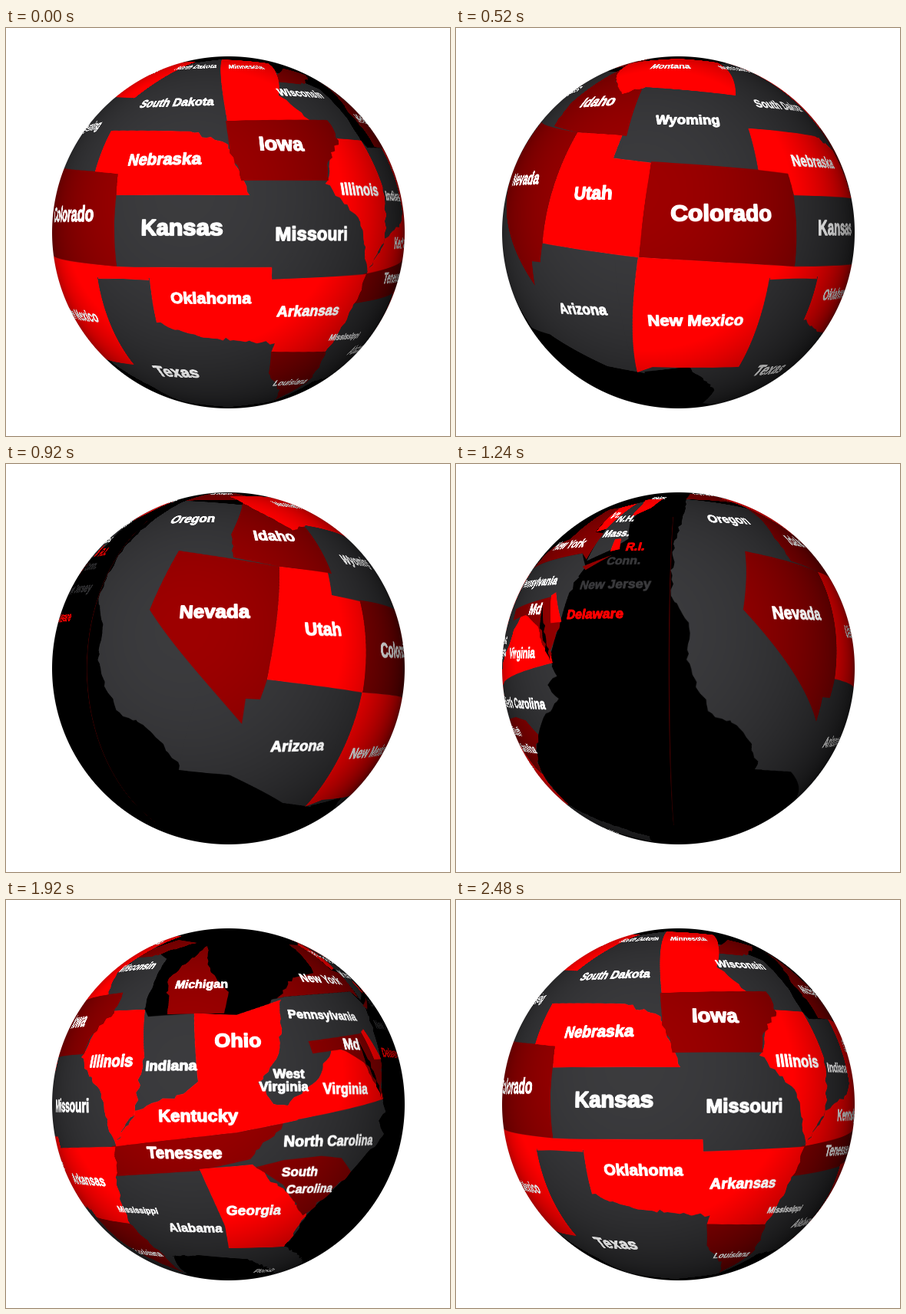
Recreate the animation shown at these times as an HTML page with a canvas. Size 578 by 532 pixels, loop 2520 ms.

```html
<!DOCTYPE html>
<html lang="en">
<head>
<meta charset="utf-8">
<title>Turning globe</title>
<style>
  html, body { margin: 0; height: 100%; overflow: hidden; background: #fff; }
  canvas { display: block; }
</style>
</head>
<body>
<canvas id="stage" width="578" height="532"></canvas>
<script>
const STEPS = 63, STEP_MS = 40;
const CX = 289.5, CY = 266.5, R = 229.5;            // globe on the stage
const EYE = 9, K = Math.sqrt(EYE * EYE - 1);        // camera distance in radii
const W = 1890, H = 945, DEG = W / 360;             // flat map
const GRAY = '#2d2d2f', RED = '#ff0000', DARK = '#780000', WHITE = '#ffffff';

let seed = 7;
const noise = () => (seed = seed * 16807 % 2147483647) / 2147483647 - 0.5;

// Stage point -> point on the unit sphere
function unproject(x, y) {
  const px = (x - CX) / R, py = (CY - y) / R, rr = px * px + py * py, a = rr / (K * K);
  const z = (a * EYE + Math.sqrt(Math.max(0, 1 - rr))) / (1 + a), s = (EYE - z) / K;
  return { x: px * s, y: py * s, z };
}

// Sphere point -> flat map, with the globe turned by a number of steps
function toMap(p, turn) {
  const u = Math.atan2(p.x, p.z) / (2 * Math.PI) + 2.5 - turn / STEPS;
  return [u % 1 * W, (0.5 - Math.atan2(p.y, Math.hypot(p.x, p.z)) / Math.PI) * H];
}

const sheet = document.createElement('canvas');
sheet.width = W;
sheet.height = H;
const map = sheet.getContext('2d', { willReadFrequently: true });
map.fillRect(0, 0, W, H);
map.textAlign = 'center';
map.textBaseline = 'middle';
map.lineJoin = 'round';

// Corners are given as seen on the globe at the current turn;
// "~" makes the edge that leads to a corner ragged, like a river or a coast
let turn = 0;
function land(color, corners) {
  map.fillStyle = color;
  map.beginPath();
  let from;
  for (const corner of corners.split(' ')) {
    const to = toMap(unproject(...corner.replace('~', '').split(',').map(Number)), turn);
    if (corner[0] === '~') {
      const [dx, dy] = [to[0] - from[0], to[1] - from[1]];
      const parts = Math.ceil(Math.hypot(dx, dy) / 9);
      for (let i = 1; i < parts; i++) {
        map.lineTo(from[0] + dx * i / parts + noise() * 7, from[1] + dy * i / parts + noise() * 7);
      }
    }
    map.lineTo(...to);
    from = to;
  }
  map.fill();
}

// Size is the em width in degrees of longitude
function label(text, x, y, size = 5.3, color = WHITE) {
  const em = size * DEG;
  map.save();
  map.translate(...toMap(unproject(x, y), turn));
  map.scale(1, 0.92);
  map.font = `bold ${em}px Arial, "Liberation Sans", sans-serif`;
  map.fillStyle = map.strokeStyle = color;
  map.lineWidth = em * 0.05;
  map.strokeText(text, 0, 0);
  map.fillText(text, 0, 0);
  map.restore();
}

// Map edge
map.fillStyle = '#380000';
map.fillRect(0, H * 0.2, 1.5, H * 0.62);

// The whole country in gray, seen from five sides
turn = 31;
land(GRAY, '300,46 ~284,100 ~280,172 ~303,207 ~300,255 ~328,322 ~366,341 ~399,399 450,402 480,190 405,60');
turn = 23;
land(GRAY, '225,399 290,405 360,442 396,447 464,298 480,200 400,70 330,60 250,300');
turn = 13;
land(GRAY, '240,75 350,60 450,110 490,200 490,320 440,430 400,478 340,486 ~300,442 236,449');
turn = 0;
land(GRAY, '243,46 281,41 358,60 408,80 ~460,143 480,300 416,422 398,462 345,487 290,494 230,487 157,440 110,300 110,140 165,92');
turn = 48;
land(GRAY, '105,180 130,143 181,143 185,152 245,148 300,150 358,130 450,130 462,200 450,340 391,411 ~362,452 ~375,480 340,492 ~310,468 250,463 ~190,465 110,420');
turn = 39;
land(GRAY, '168,132 186,127 308,113 327,131 ~318,165 316,206 303,257 ~318,277 ~299,289 ~318,307 ~281,333 258,357 212,412 100,400 90,300');
land(GRAY, '314,50 325,46 345,76 364,98 350,112 324,124 318,84');

// West
turn = 31;
land(DARK, '299,46 380,48 330,39 304,39');
turn = 23;
land(DARK, '308,50 ~350,73 ~390,83 424,143 356,134 296,122 ~293,92');
land(DARK, '225,113 356,134 340,281 331,307 312,306 307,339 187,190');
land(RED, '356,134 419,142 424,171 468,181 464,298 340,281');
turn = 13;
land(RED, '228,46 ~216,86 ~247,77 364,88 340,45 290,40');
land(DARK, '254,174 434,189 441,311 238,299');
land(RED, '237,299 441,311 470,311 470,327 408,326 368,442 256,442 236,449');

// East
turn = 48;
land(DARK, '165,76 225,52 250,56 ~190,74');
land(DARK, '210,149 ~212,102 ~262,60 ~266,92 ~290,120 284,148');
land(DARK, '138,321 300,303 361,291 ~318,338 252,353 130,361');
land(RED, '131,145 181,143 180,205 ~168,275 ~142,319 ~124,253 ~98,205 ~118,170');
land(RED, '245,148 300,150 358,130 ~355,200 ~328,238 ~350,270 380,287 300,303 143,321 ~168,275 ~231,253 250,237');
land(RED, '252,351 321,345 ~391,409 ~362,452 290,454 285,425');
turn = 39;
land(DARK, '130,346 155,338 200,334 233,338 258,357 ~212,412 ~165,370');
land(RED, '105,299 310,259 ~297,232 ~262,200 217,190 ~190,232 ~150,268 ~130,262');
land(DARK, '187,184 284,170 316,206 ~303,257 ~272,210 235,193 188,200');
land(RED, '284,168 292,164 318,204 298,205');
land('black', '271,180 282,205 ~308,260 ~276,212');
land(DARK, '175,130 ~215,101 255,92 ~275,55 296,54 303,85 320,88 322,122 308,113 186,127');
land(DARK, '322,131 358,118 330,136');
land(RED, '346,97 354,97 363,111 352,113');
land(RED, '296,54 314,50 318,82 304,85');
land(RED, '315,46 335,46 346,58 337,69 325,52');

// Middle
turn = 0;
land(RED, '120,311 346,312 346,328 469,321 ~416,422 345,423 350,411 ~262,404 ~196,384 187,326 120,327');
land(DARK, '345,422 416,422 ~396,458 ~349,485 ~342,450');
land(RED, '137,134 240,135 ~289,152 ~317,218 144,218 146,190 116,187');
land(RED, '281,41 288,121 399,122 ~355,88 352,60 341,46');
land(DARK, '286,121 418,120 ~433,147 ~418,178 ~420,199 306,199 ~291,155');

label('North Dakota', 246, 51);
label('South Dakota', 219, 98);
label('Nebraska', 204, 172, 5.7);
label('Kansas', 227, 262, 7.1);
label('Oklahoma', 266, 354);
label('Texas', 222, 450, 8);
label('Minnesota', 313, 51);
label('Iowa', 359, 153, 7.1);
label('Missouri', 401, 270, 6);
label('Arkansas', 396, 370);
label('Louisiana', 371, 463, 4.8);
label('Wisconsin', 386, 86);
turn = 13;
label('Montana', 279, 50, 7);
label('Wyoming', 302, 121);
label('Colorado', 348, 244, 7.1);
label('New Mexico', 313, 383, 5.7);
turn = 23;
label('Washington', 280, 39);
label('Nevada', 271, 194, 6.1);
label('Idaho', 350, 95, 7);
label('Utah', 414, 217, 6);
label('Arizona', 381, 369);
turn = 31;
label('Oregon', 356, 73, 6.7);
turn = 39;
label('South', 179, 355, 4.5);
label('Carolina', 202, 378, 4.5);
label('North Carolina', 215, 316, 5);
label('Virginia', 232, 247, 5);
label('West', 154, 228, 4.2);
label('Virginia', 147, 245, 4.2);
label('Pennsylvania', 228, 149, 4.7);
label('New York', 262, 100);
label('Md', 255, 187);
label('Vt.', 309, 65);
label('N.H.', 333, 71);
label('Mass.', 341, 90, 4.8);
label('Maine', 328, 45, 4.8);
label('R.I.', 381, 110, 5, RED);
label('Conn.', 378, 127, 4.7, GRAY);
label('New Jersey', 381, 158, 4.7, GRAY);
label('Delaware', 367, 196, 4.6, RED);
turn = 48;
label('Illinois', 135, 211, 5.8);
label('Indiana', 214, 217, 4.7);
label('Michigan', 254, 111, 4.8);
label('Ohio', 302, 185, 6.4);
label('Kentucky', 249, 283);
label('Tenessee', 231, 331);
label('Mississippi', 170, 405, 3.5);
label('Alabama', 246, 429);
label('Georgia', 323, 406);
label('Florida', 336, 484);

// Per-pixel lookup: map position, light and edge coverage
const texels = map.getImageData(0, 0, W, H).data;
const LEFT = 58, TOP = 35, SIZE = 463;
const ctx = document.getElementById('stage').getContext('2d');
const image = ctx.createImageData(SIZE, SIZE);
const pixels = [];
for (let j = 0; j < SIZE; j++) {
  for (let i = 0; i < SIZE; i++) {
    const x = LEFT + i + 0.5, y = TOP + j + 0.5;
    const cover = Math.min(1, R + 0.5 - Math.hypot(x - CX, y - CY));
    if (cover <= 0) continue;
    const p = unproject(x, y), [u, v] = toMap(p, 0);
    const at = (j * SIZE + i) * 4;
    image.data[at + 3] = cover * 255;
    pixels.push({ at, u: u - 0.5 + W, v: v - 0.5, light: 0.42 - 0.2 * p.x + 0.18 * p.y + 0.85 * p.z });
  }
}

function draw(step) {
  const shift = step * W / STEPS, out = image.data, row = W * 4;
  for (const { at, u, v, light } of pixels) {
    const x = (u - shift) % W, x0 = x | 0, y0 = v | 0, fx = x - x0, fy = v - y0;
    const a = (y0 * W + x0) * 4, b = (y0 * W + (x0 + 1) % W) * 4;
    for (let c = 0; c < 3; c++) {
      const top = texels[a + c] * (1 - fx) + texels[b + c] * fx;
      const low = texels[a + row + c] * (1 - fx) + texels[b + row + c] * fx;
      out[at + c] = (top + (low - top) * fy) * light;
    }
  }
  ctx.putImageData(image, LEFT, TOP);
}

const start = performance.now();
let shown = -1;
function tick() {
  const step = Math.floor((performance.now() - start) / STEP_MS) % STEPS;
  if (step !== shown) draw(shown = step);
  requestAnimationFrame(tick);
}
tick();
</script>
</body>
</html>
```
